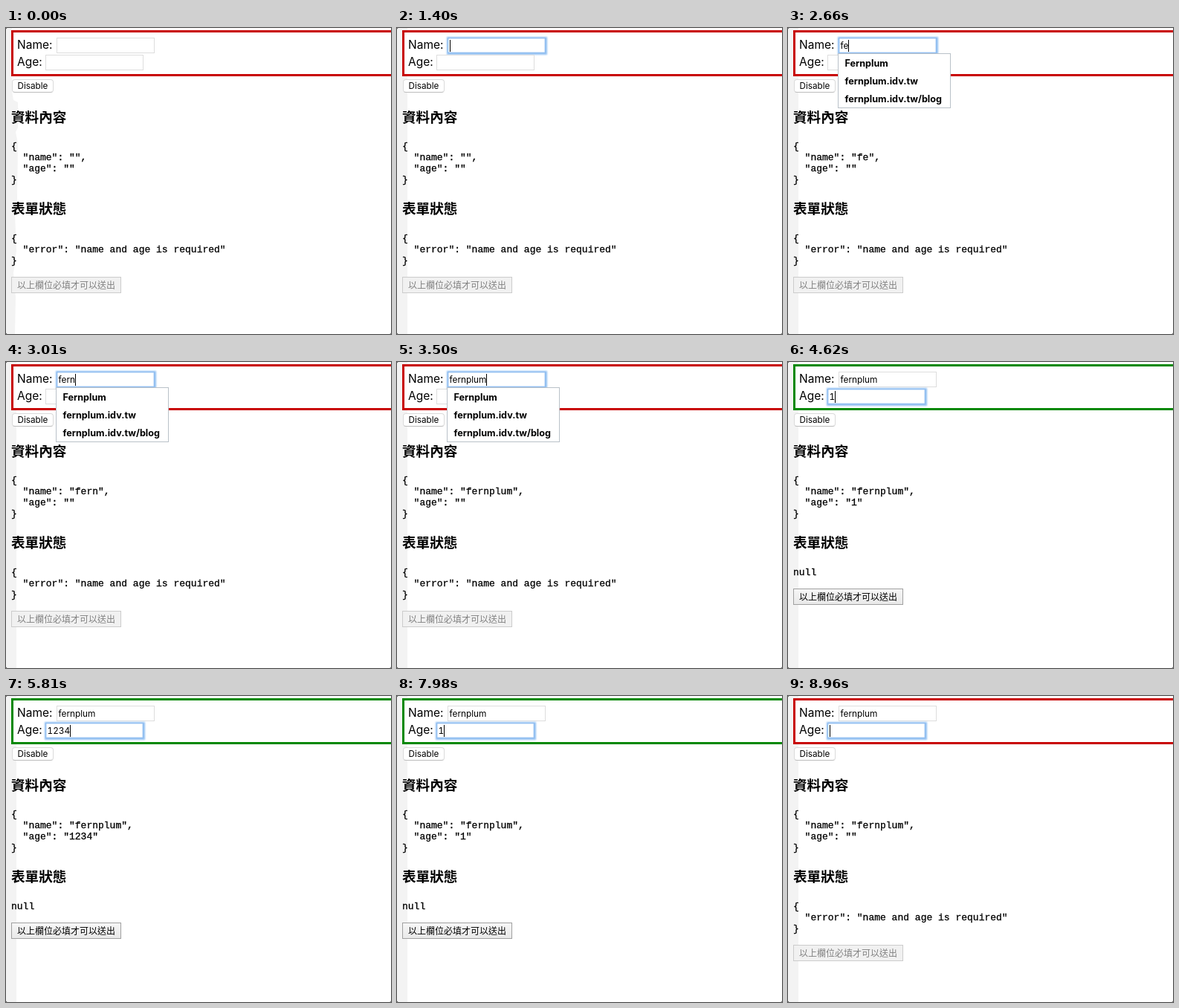
These frames come from a looping animation (518 by 412 pixels, 9380 ms). An HTML page:

```html
<!DOCTYPE html>
<html lang="zh-Hant">
<head>
<meta charset="utf-8">
<title>Form validation</title>
<style>
html, body { margin: 0; width: 100%; height: 100%; overflow: hidden; background: #444; }
#stage { position: absolute; left: 0; top: 0; width: 518px; height: 412px; overflow: hidden;
  background: #fff; border-radius: 3px 0 2px 3px; color: #000; font-family: Inter, sans-serif; }
#stage * { position: absolute; box-sizing: border-box; margin: 0; white-space: pre; }
#strip { left: 0; top: 0; width: 16px; height: 412px; background: #f3f3f3; }
#form { left: 7px; top: 3px; width: 530px; height: 62px; border: 3px solid #c80000; background: #fff; }
.label { left: 15px; font-size: 15.5px; line-height: 20px; }
.field { width: 132px; height: 21px; border: 1px solid #ddd; background: #fff; }
.field.focus { border-color: #8ebcf0; box-shadow: 0 0 2px 1.5px #93c1f2, inset 0 0 1px 0.5px #b5d4f6; }
.field span { left: 1.5px; top: 0; height: 20px; font-size: 11.8px; line-height: 20px; font-variant-numeric: tabular-nums; }
.field.caret span::after { content: ""; position: absolute; left: 100%; top: 2px; width: 1px; height: 16px; background: #000; }
#toggle { left: 8px; top: 69px; width: 56px; height: 18px; border: 1px solid #dadada; border-bottom-color: #bdbdbd;
  border-radius: 4px; background: #fff; font-size: 11.7px; line-height: 16px; text-align: center; }
h3 { left: 7px; font: 700 18.6px/20px "Noto Sans CJK TC", "Noto Sans CJK", sans-serif; }
pre { left: 7px; font: 13px/14.85px "Liberation Mono", monospace; -webkit-text-stroke: 0.3px #000; }
#send { left: 7px; width: 148px; height: 22px; border: 1px solid #ccc; background: #f1f1f1; color: #808080;
  font: 12px/19px "Noto Sans CJK TC", "Noto Sans CJK", sans-serif; text-align: center; }
#send.on { border-color: #a0a0a0; background: linear-gradient(#f6f6f6, #e9e9e9); color: #000; }
#popup { left: 67px; top: 34px; width: 152px; height: 74px; border: 1px solid #b9c1c8; background: #fff; }
#popup b { left: 8.5px; font-size: 12.6px; line-height: 24px; }
</style>
</head>
<body>
<div id="stage">
  <div id="strip"></div>
  <div id="form"></div>
  <div class="label" style="top:13px">Name:</div>
  <div class="label" style="top:36px">Age:</div>
  <div class="field" id="name" style="left:68px;top:13px"><span></span></div>
  <div class="field" id="age" style="left:53px;top:36px"><span></span></div>
  <div id="toggle">Disable</div>
  <h3 style="top:109px">資料內容</h3>
  <pre id="data" style="top:153px"></pre>
  <h3 style="top:232px">表單狀態</h3>
  <pre id="status" style="top:277px"></pre>
  <div id="send">以上欄位必填才可以送出</div>
  <div id="popup">
    <b style="top:1px">Fernplum</b>
    <b style="top:25px">fernplum.idv.tw</b>
    <b style="top:49px">fernplum.idv.tw/blog</b>
  </div>
</div>
<script>
const LOOP = 9380;
const NAME = 'fernplum', AGE = '1234';
const $ = id => document.getElementById(id);

// Each step changes part of the state: typed lengths, focus, caret, popup opacity.
const steps = [
  [0, { name: 0, age: 0, focus: '', caret: 0, popup: 0, rough: 1 }],
  [140, { rough: 0 }],
  [1400, { focus: 'name', caret: 1 }],
  [1890, { caret: 0 }],
  [2100, { caret: 1 }],
  [2450, { name: 1 }],
  [2520, { popup: 0.6 }],
  [2590, { popup: 1 }],
  [2660, { name: 2 }],
  [2870, { name: 3 }],
  [3010, { name: 4 }],
  [3150, { name: 5 }],
  [3220, { name: 6 }],
  [3290, { name: 7 }],
  [3500, { name: 8 }],
  [3780, { focus: 'age', popup: 0 }],
  [4270, { caret: 0 }],
  [4620, { age: 1, caret: 1 }],
  [5040, { age: 2 }],
  [5390, { age: 3 }],
  [5810, { age: 4 }],
  [6370, { caret: 0 }],
  [6930, { caret: 1 }],
  [7420, { caret: 0 }],
  [7560, { age: 3, caret: 1 }],
  [7770, { age: 2 }],
  [7980, { age: 1 }],
  [8120, { age: 0 }],
  [8470, { caret: 0 }],
  [8960, { caret: 1 }]
];

const STRAIGHT = 'polygon(0 0, 14px 0, 14px 100%, 0 100%)';
const ROUGH = 'polygon(0 0, 8px 0, 8px 84px, 10px 97px, 16px 100px, 16px 134px, 13px 140px, ' +
  '16px 155px, 15px 230px, 12px 250px, 14px 300px, 10px 330px, 13px 362px, 12px 100%, 0 100%)';

function drawField(id, text, s) {
  const el = $(id), focused = s.focus === id;
  el.classList.toggle('focus', focused);
  el.classList.toggle('caret', focused && !!s.caret);
  el.firstChild.textContent = text;
}

function draw(s) {
  const name = NAME.slice(0, s.name), age = AGE.slice(0, s.age);
  const valid = name && age;
  drawField('name', name, s);
  drawField('age', age, s);
  $('data').textContent = JSON.stringify({ name, age }, null, 2);
  $('status').textContent = JSON.stringify(valid ? null : { error: 'name and age is required' }, null, 2);
  $('form').style.borderColor = valid ? '#008800' : '#c80000';
  $('send').className = valid ? 'on' : '';
  $('send').style.top = valid ? '305px' : '335px';
  $('popup').style.opacity = s.popup;
  $('strip').style.clipPath = s.rough ? ROUGH : STRAIGHT;
}

const start = performance.now();
let shown = -1;
function tick() {
  const t = Math.max(0, performance.now() - start) % LOOP;
  const past = steps.filter(([at]) => at <= t);
  if (past.length !== shown) {
    shown = past.length;
    draw(Object.assign({}, ...past.map(([, change]) => change)));
  }
  requestAnimationFrame(tick);
}
tick();
</script>
</body>
</html>
```
